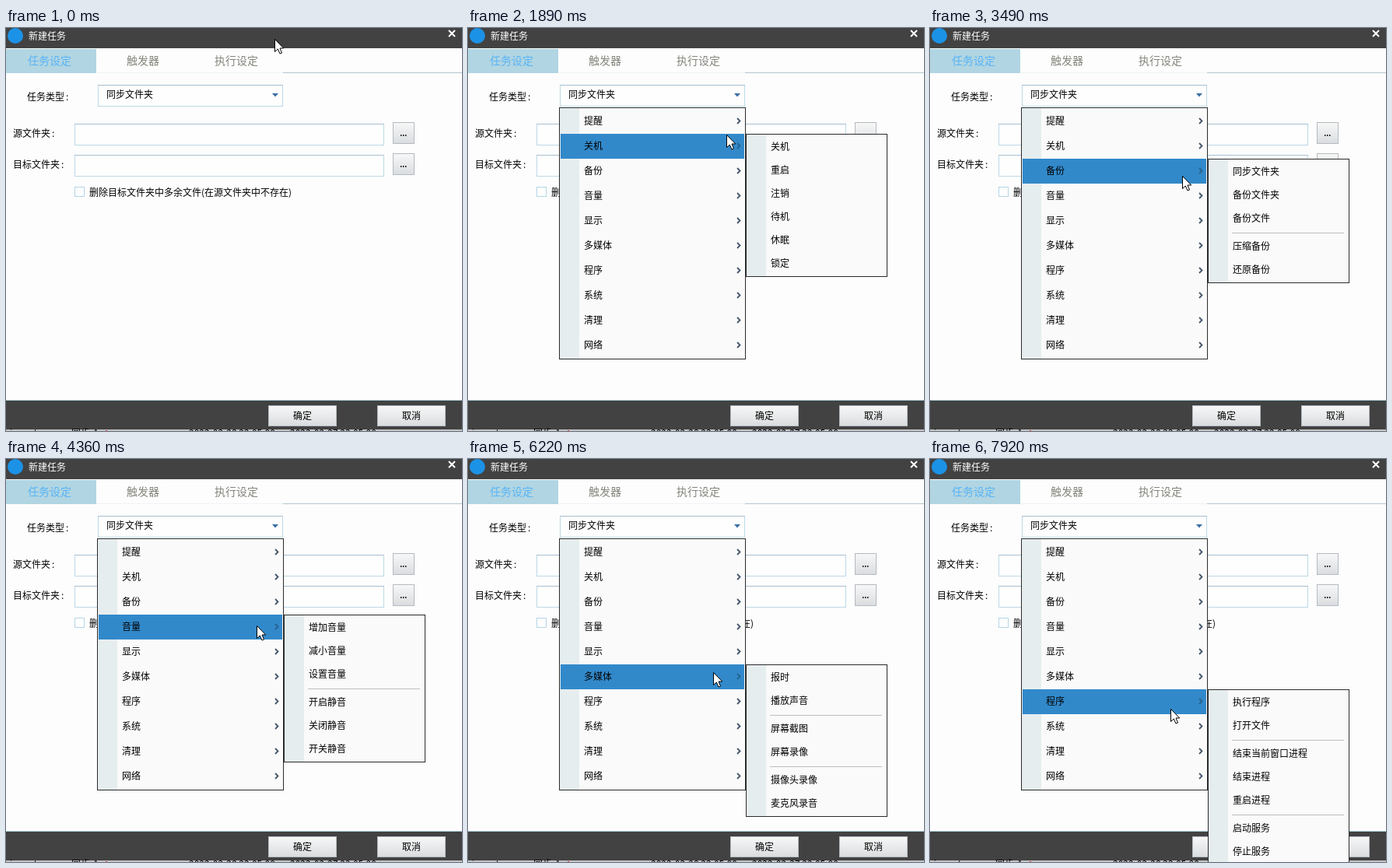
Recreate the animation shown at these times as an HTML page with a canvas. Size 586 px wide and 518 px high, loop 7.99 s.

```html
<!DOCTYPE html>
<html lang="zh-CN">
<head>
<meta charset="utf-8">
<title>新建任务</title>
<style>
html, body { margin: 0; width: 100%; height: 100%; overflow: hidden; background: #fdfdfd }
canvas { display: block }
</style>
</head>
<body>
<canvas id="stage" width="586" height="518"></canvas>
<script>
const g = document.getElementById('stage').getContext('2d');
const LOOP = 7990, MENU_OPENS = 940;

// first step, last step, number of steps, x and y reached
const moves = [
  [120, 810, 10, 344, 89], [1140, 1410, 5, 334, 126], [1890, 2030, 3, 328, 159],
  [2490, 2490, 1, 327, 160], [2690, 2690, 1, 325, 161], [2760, 2760, 1, 325, 170],
  [3360, 3630, 4, 323, 210], [4360, 4360, 1, 322, 214], [4430, 4640, 4, 319, 240],
  [5040, 5180, 3, 317, 248], [5380, 5590, 4, 317, 260], [5660, 5870, 4, 316, 272],
  [6220, 6220, 1, 315, 274], [6290, 6770, 7, 311, 298], [6970, 7040, 2, 311, 313],
  [7440, 7440, 1, 311, 314], [7710, 7920, 4, 309, 321]
];

const menu = '提醒 关机 备份 音量 显示 多媒体 程序 系统 清理 网络'.split(' ');
const submenus = [
  '消息提醒 声音提醒',
  '关机 重启 注销 待机 休眠 锁定',
  '同步文件夹 备份文件夹 备份文件 | 压缩备份 还原备份',
  '增加音量 减小音量 设置音量 | 开启静音 关闭静音 开关静音',
  '最小化所有窗口/恢复 | 窗口置顶/取消 窗口隐藏/恢复 | 激活显示器 关闭显示器 | 激活屏保 关闭屏保',
  '报时 播放声音 | 屏幕截图 屏幕录像 | 摄像头录像 麦克风录音',
  '执行程序 打开文件 | 结束当前窗口进程 结束进程 重启进程 | 启动服务 停止服务'
].map(s => s.split(' '));

const arrow = new Path2D('M.5 .5V16.5L4.3 13L7 19L9.5 18L7 12H11.8Z');
const hand = new Path2D('M-2 1Q0-1.5 2 1V7Q4 5.5 5.5 7.5Q7.5 6.5 8.5 8.5Q11 8 11.5 10.5V16L9 20V23H-.5V20.5L-4.5 14Q-6 11.5-4 11L-2 13Z');

function rect(x, y, w, h, color) {
  g.fillStyle = color;
  g.fillRect(x, y, w, h);
}

function box(x, y, w, h, fill, border) {
  rect(x, y, w, h, border);
  rect(x + 1, y + 1, w - 2, h - 2, fill);
}

// cy is the vertical middle of the characters
function text(s, x, cy, color = '#000', size = 12, align = 'left') {
  g.font = size + 'px "Noto Sans CJK SC", "Noto Sans CJK", sans-serif';
  g.fillStyle = color;
  g.textAlign = align;
  g.fillText(s, x, Math.round(cy + size * .38));
}

function label(s, x, cy) {
  text(s, x, cy);
  text(':', x + 12 * s.length + 2, cy);
}

function shade(y, h, from, to) {
  const grad = g.createLinearGradient(0, y, 0, y + h);
  grad.addColorStop(0, from);
  grad.addColorStop(1, to);
  return grad;
}

function button(s, x, y, w, h) {
  box(x, y, w, h, shade(y, h, '#f8f8f8', '#d9dcdf'), '#b4bac0');
  text(s, x + w / 2, y + h / 2, '#000', 12, 'center');
}

function field(x, y, w, h) {
  box(x, y, w, h, '#fefefe', '#bcd9e6');
  rect(x, y, w, 1, '#a9bfd0');
}

function stroke(path, color, width) {
  g.strokeStyle = color;
  g.lineWidth = width;
  g.stroke(path);
}

function drawWindow() {
  rect(0, 0, 586, 518, '#fdfdfd');
  rect(0, 0, 586, 26, '#424242');
  g.fillStyle = '#1c92e6';
  g.beginPath();
  g.arc(12, 10, 10, 0, 7);
  g.fill();
  text('新建任务', 29, 10, '#fff');
  stroke(new Path2D('M569 3L577 11M577 3L569 11'), '#fff', 2);

  rect(0, 27, 116, 31, '#b1d5e2');
  rect(116, 57, 240, 1, '#eef3f5');
  rect(356, 57, 230, 1, '#b3c5ce');
  text('任务设定', 28, 42, '#58b4f6', 14);
  text('触发器', 155, 42, '#85857c', 14);
  text('执行设定', 268, 42, '#85857c', 14);

  label('任务类型', 27, 88);
  label('源文件夹', 9, 135);
  label('目标文件夹', 9, 175);
  for (const y of [123, 163]) {
    field(88, y, 398, 28);
    button('', 497, y - 2, 28, 28);
    for (const x of [507, 510, 513]) rect(x, y + 14, 1.5, 2, '#222');
  }
  box(88, 204, 13, 13, '#fefefe', '#b5d5e5');
  text('删除目标文件夹中多余文件(在源文件夹中不存在)', 107, 211);

  rect(0, 478, 586, 1, '#a9cbd8');
  rect(0, 479, 586, 37, '#424242');
  rect(0, 516, 586, 2, '#c4c4c4');
  text('inventory', 5, 520);
  text('同步-1', 84, 520);
  text('2022-02-28 22:05:00', 235, 520);
  text('2022-02-27 22:05:00', 365, 520);
  rect(128, 517, 2, 1, '#d33');
  button('确定', 337, 485, 88, 27);
  button('取消', 477, 485, 88, 27);
}

function drawCombo(hover) {
  field(118, 73, 238, 28);
  if (hover) {
    box(117, 72, 240, 30, '#3a9ad2', '#3a9ad2');
    rect(119, 74, 217, 26, '#fefefe');
    rect(337, 74, 18, 26, shade(74, 26, '#c5e8fa', '#7cc6ee'));
  }
  text('同步文件夹', 129, 85);
  g.fillStyle = '#3a6ea5';
  g.fill(new Path2D('M342 84H350L346 88.5Z'));
}

function panel(x, y, w, h) {
  box(x, y, w, h, '#fafafa', '#2b2b2b');
  rect(x + 1, y + 1, 25, h - 2, '#e6edef');
}

function drawMenu(active) {
  panel(117, 102, 240, 324);
  menu.forEach((name, i) => {
    const y = 104 + 32 * i, on = i === active;
    if (on) rect(119, y, 236, 32, '#3289ca');
    text(name, 149, y + 15.5);
    stroke(new Path2D(`M346 ${y + 12}L349.5 ${y + 15.5}L346 ${y + 19}`), on ? '#25638f' : '#44566a', 1.8);
  });
}

function drawSubmenu(active) {
  const items = submenus[active], top = 104 + 32 * active;
  const step = s => s === '|' ? 6 : 30;
  panel(357, top, 182, items.reduce((h, s) => h + step(s), 4));
  let y = top + 2;
  for (const s of items) {
    if (s === '|') rect(388, y + 3, 144, 1, '#bdbdbd');
    else text(s, 389, y + 14.5);
    y += step(s);
  }
}

function pointer(t) {
  let x = 345, y = 14;
  for (const [from, to, n, tx, ty] of moves) {
    if (t < from) break;
    const gap = (to - from) / (n - 1) || 1;
    const k = Math.min(1, (Math.floor((t - from) / gap + 1e-6) + 1) / n);
    x += (tx - x) * k;
    y += (ty - y) * k;
  }
  return [Math.round(x), Math.round(y)];
}

function drawPointer(shape, x, y) {
  g.save();
  g.translate(x, y);
  g.fillStyle = '#fff';
  g.fill(shape);
  stroke(shape, '#000', 1);
  if (shape === hand) stroke(new Path2D('M2 7V11M5.5 8V11M8.5 9V12'), '#000', 1);
  g.restore();
}

function draw(now) {
  const t = now % LOOP, [x, y] = pointer(t);
  const hover = y >= 73 && y < 102;
  drawWindow();
  drawCombo(hover);
  if (t >= MENU_OPENS) {
    const active = Math.floor((y - 104) / 32);
    drawMenu(active);
    if (active >= 0) drawSubmenu(active);
  }
  drawPointer(hover ? hand : arrow, x, y);
  requestAnimationFrame(draw);
}
requestAnimationFrame(draw);
</script>
</body>
</html>
```
